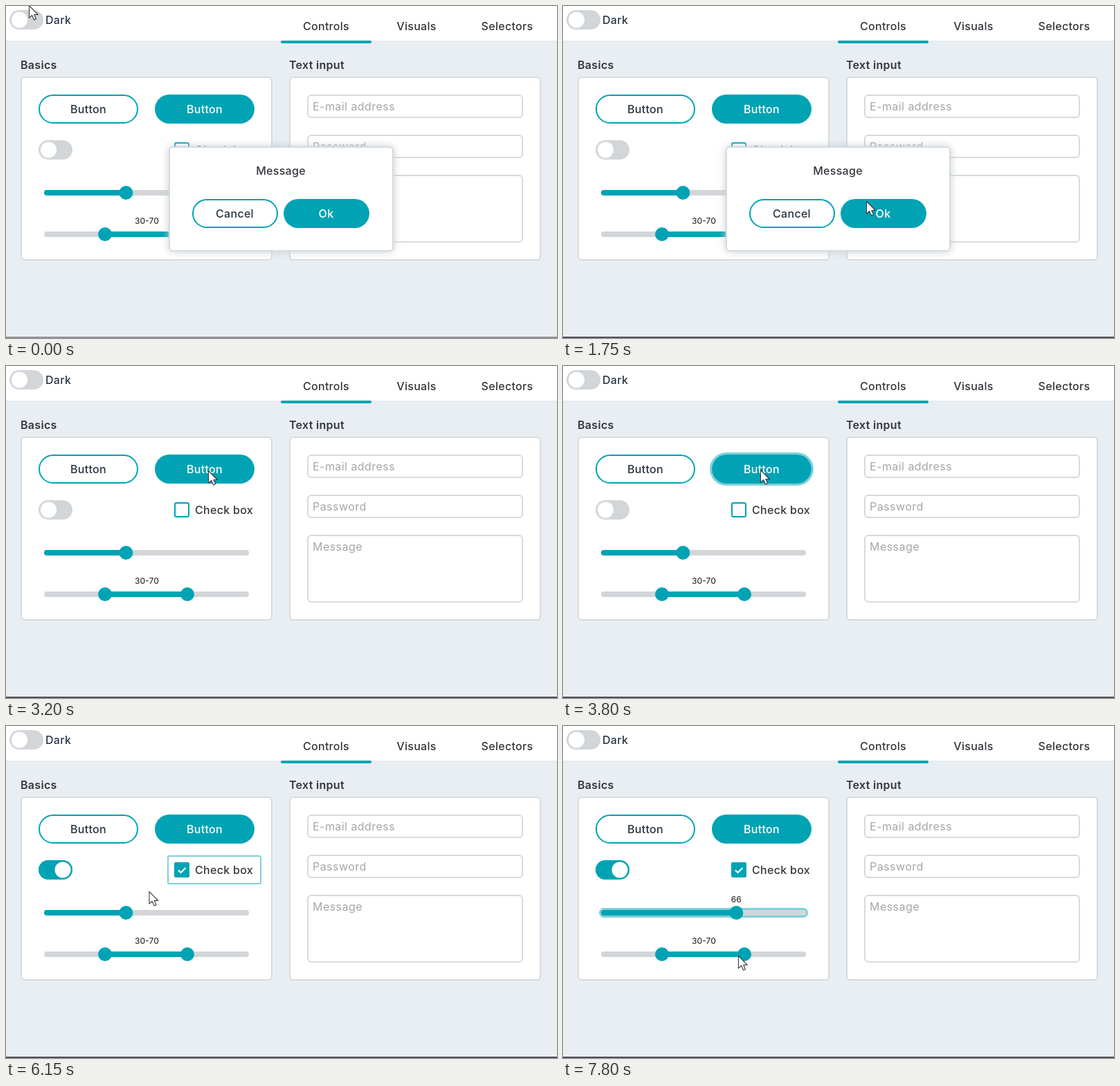
An HTML page that plays this animation: 796x480 px, repeating every 8000 ms.

```html
<!DOCTYPE html>
<html lang="en">
<head>
<meta charset="utf-8">
<title>Controls</title>
<style>
  html, body { margin: 0; width: 100%; height: 100%; overflow: hidden; background: #e9eef2; }
  svg { display: block; width: 796px; height: 480px; }
  text { font: 500 16px Inter, "Open Sans", sans-serif; letter-spacing: .3px; fill: #34363b; }
  .mid { text-anchor: middle; }
  .head { font-weight: 600; }
  .hint { fill: #a5a6a8; font-weight: 400; letter-spacing: .45px; }
  .navy { fill: #263442; }
  .small { font-size: 12px; letter-spacing: 0; }
  .light { fill: #fff; }
  .teal { fill: #00a3b4; }
  .grey { fill: #d3d6d9; }
  .white { fill: #fff; }
  .box { fill: #fff; stroke: #d5dbe0; stroke-width: 2; }
  .line { fill: #fff; stroke: #00a3b4; stroke-width: 2; }
  .ring { fill: none; stroke: #80d0d9; stroke-width: 3; }
  #dialog { filter: drop-shadow(0 0 6px #c8ccd0); }
</style>
</head>
<body>
<svg viewBox="0 0 796 480" xmlns="http://www.w3.org/2000/svg">
  <rect width="796" height="480" fill="#e9eef2"/>
  <rect width="796" height="50" class="white"/>
  <rect y="50" width="796" height="2" fill="#e6ebef"/>
  <rect x="397" y="50" width="131" height="4" rx="2" class="teal"/>
  <rect x="5" y="6" width="49" height="28" rx="14" class="grey"/>
  <circle cx="19.5" cy="20" r="11.5" class="white"/>
  <text x="57" y="26" class="navy">Dark</text>
  <text x="462.5" y="35" class="mid">Controls</text>
  <text x="593" y="35" class="mid">Visuals</text>
  <text x="724" y="35" class="mid">Selectors</text>

  <text x="21" y="91" class="head">Basics</text>
  <text x="409" y="91" class="head">Text input</text>
  <rect x="22" y="103" width="362" height="264" rx="5" class="box"/>
  <rect x="410" y="103" width="362" height="264" rx="5" class="box"/>

  <rect x="436" y="129" width="310" height="32" rx="5" class="box"/>
  <rect x="436" y="187" width="310" height="32" rx="5" class="box"/>
  <rect x="436" y="245" width="310" height="96" rx="5" class="box"/>
  <text x="443" y="151" class="hint">E-mail address</text>
  <text x="443" y="209" class="hint">Password</text>
  <text x="443" y="267" class="hint">Message</text>

  <rect id="outlineRing" x="45.5" y="126.5" width="147" height="45" rx="22.5" class="ring"/>
  <rect x="48" y="129" width="142" height="40" rx="20" class="line"/>
  <text x="119" y="155" class="mid navy">Button</text>
  <rect id="solidRing" x="213.5" y="126.5" width="147" height="45" rx="22.5" class="ring"/>
  <rect x="215" y="128" width="144" height="42" rx="21" class="teal"/>
  <text x="287" y="155" class="mid light">Button</text>

  <rect id="toggleRing" x="45.5" y="192.5" width="52" height="31" rx="15.5" class="ring"/>
  <rect x="47" y="194" width="49" height="28" rx="14" class="grey"/>
  <rect id="toggleFill" x="47" y="194" height="28" rx="14" class="teal"/>
  <circle id="knob" cy="208" r="11.5" class="white"/>

  <rect id="checkRing" x="234" y="188" width="134" height="40" rx="2" class="ring" style="stroke-width:2"/>
  <rect x="244" y="198" width="20" height="20" rx="2" class="line"/>
  <g id="check">
    <rect x="243" y="197" width="22" height="22" rx="3" class="teal"/>
    <path d="M249 208.5l3.5 3.5 7-7" fill="none" stroke="#fff" stroke-width="2.2"/>
  </g>
  <text x="273" y="214">Check box</text>

  <rect id="sliderRing" x="53.5" y="264.5" width="299" height="11" rx="5.5" class="ring"/>
  <rect x="55" y="266" width="296" height="8" rx="4" class="grey"/>
  <rect id="sliderFill" x="55" y="266" height="8" rx="4" class="teal"/>
  <circle id="thumb" cy="270" r="10" class="teal"/>
  <text id="value" y="255" class="mid small"></text>

  <rect x="55" y="326" width="296" height="8" rx="4" class="grey"/>
  <rect x="143" y="326" width="119" height="8" class="teal"/>
  <circle cx="143" cy="330" r="10" class="teal"/>
  <circle cx="262" cy="330" r="10" class="teal"/>
  <text x="203.5" y="315" class="mid small">30-70</text>

  <g id="dialog">
    <rect x="236" y="204" width="323" height="150" rx="5" class="box"/>
    <text x="397" y="244" class="mid">Message</text>
    <rect x="270" y="280" width="122" height="40" rx="20" class="line"/>
    <text x="330.5" y="306" class="mid navy">Cancel</text>
    <rect x="401" y="279" width="124" height="42" rx="21" class="teal"/>
    <text x="462.5" y="306" class="mid light">Ok</text>
  </g>

  <rect id="edge" y="478" width="796" height="2"/>
  <path id="cursor" d="M.5 .5V18.3L4.6 14.5 7.6 21 10.6 19.7 7.8 13.5H13.3Z" fill="#fff" stroke="#35373b" stroke-width="1.1" stroke-linejoin="round"/>
</svg>
<script>
  const LOOP = 8000;
  const DRAG_START = 6850;
  const part = id => document.getElementById(id);
  const set = (id, attrs) => {
    for (const name in attrs) part(id).setAttribute(name, attrs[name]);
  };

  // Progress from 0 to 1 in visible steps, the first at start and the last at end.
  function stepped(t, start, end, step = 100) {
    const count = Math.round((end - start) / step) + 1;
    const done = Math.floor((t - start) / step) + 1;
    return Math.min(1, Math.max(0, done / count));
  }
  const easeOut = (p, power = 3) => 1 - (1 - p) ** power;
  const fade = (t, start) => stepped(t, start, start + 100);
  const shown = (t, from, until = Infinity) => fade(t, from) - (t < until ? 0 : fade(t, until));

  // The pointer glides from one stop to the next.
  const moves = [
    { start: 600, end: 1250, x: 438, y: 282, step: 50 },
    { start: 2800, end: 3200, x: 292, y: 151, step: 133 },
    { start: 3700, end: 3700, x: 285, y: 150 },
    { start: 3900, end: 4000, x: 133, y: 150 },
    { start: 4450, end: 4750, x: 67, y: 207 },
    { start: 5300, end: 5650, x: 255, y: 199 },
    { start: 6150, end: 6450, x: 171, y: 268 },
    { start: DRAG_START, end: 7100, x: 252, y: 282 },
    { start: 7400, end: 7800, x: 253, y: 332, step: 133 }
  ];

  function pointerAt(t) {
    let x = 33, y = -1;
    for (const move of moves) {
      const p = easeOut(stepped(t, move.start, move.end, move.step));
      x += (move.x - x) * p;
      y += (move.y - y) * p;
    }
    return { x, y };
  }

  function draw(t) {
    const pointer = pointerAt(t);
    set('cursor', { transform: `translate(${pointer.x} ${pointer.y})` });

    set('dialog', { opacity: 1 - stepped(t, 2200, 2450, 83) });
    set('solidRing', { opacity: shown(t, 3450, 4450) });
    set('outlineRing', { opacity: shown(t, 4150, 5100) });
    set('toggleRing', { opacity: shown(t, 5000, 5900) });
    set('checkRing', { opacity: shown(t, 5900, 6750) });
    set('check', { opacity: shown(t, 5900) });
    set('sliderRing', { opacity: shown(t, 6750) });
    set('value', { opacity: shown(t, 6750) });

    const on = easeOut(stepped(t, 5000, 5300), 2);
    set('toggleFill', { width: 49 * on });
    set('knob', { cx: 61.5 + 20.5 * on });

    // While dragged, the thumb follows the pointer in whole percents.
    const value = t < DRAG_START ? 40 : Math.round((pointer.x - 57) / 2.96);
    const x = 55 + 2.96 * value;
    set('sliderFill', { width: x - 55 });
    set('thumb', { cx: x });
    set('value', { x });
    part('value').textContent = value;

    set('edge', { fill: t < 1750 ? '#929497' : '#505257' });
  }

  const start = performance.now();
  function tick() {
    draw((performance.now() - start) % LOOP);
    requestAnimationFrame(tick);
  }
  draw(0);
  requestAnimationFrame(tick);
</script>
</body>
</html>
```
